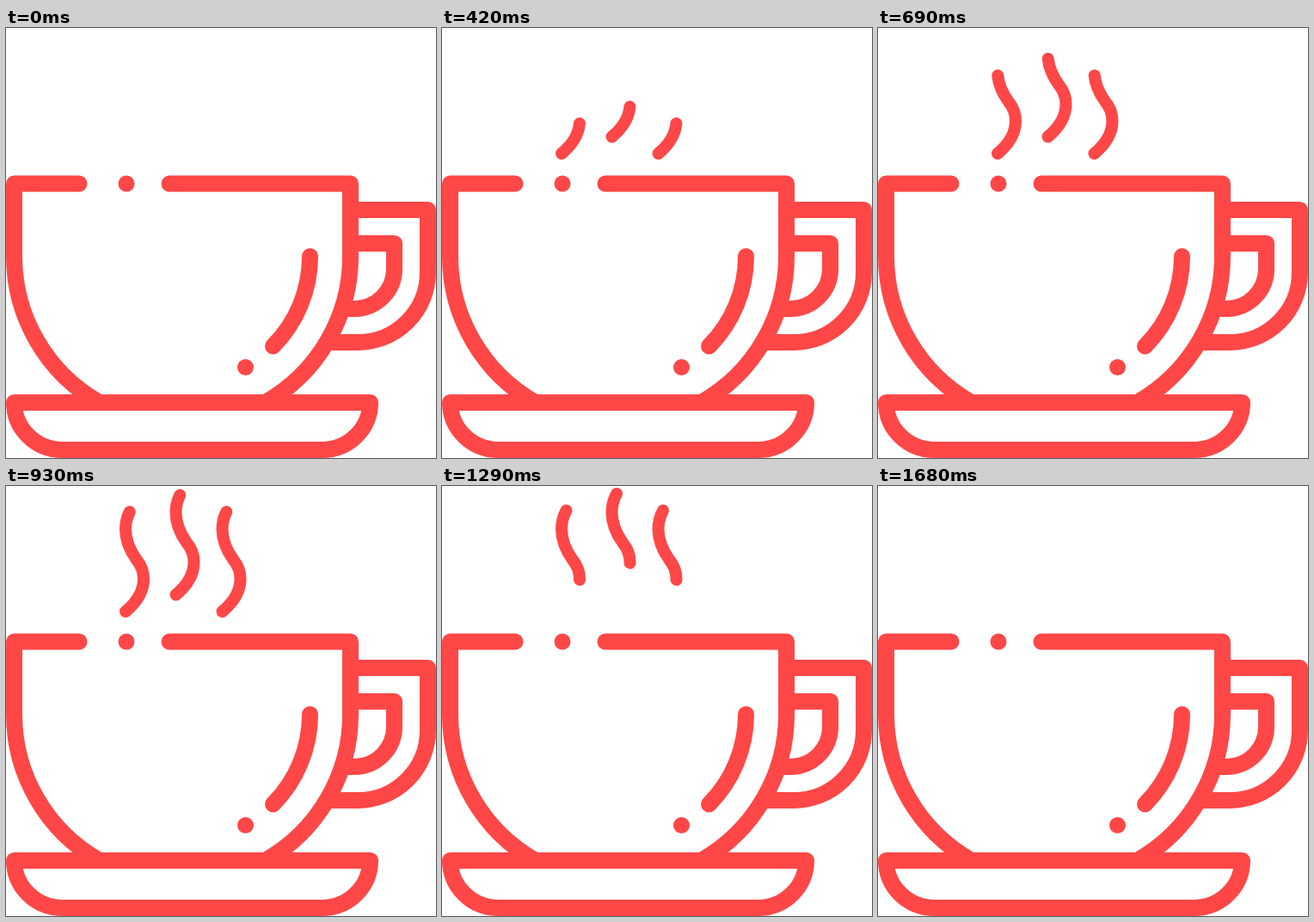
An HTML page for the animation above (1.83 s loop, 500 px wide and 500 px high).

```html
<!DOCTYPE html>
<html lang="en">
<head>
<meta charset="utf-8">
<title>Steaming cup</title>
<style>
  html, body { margin: 0; width: 100%; height: 100%; overflow: hidden; background: #fff; }
  svg { display: block; width: 100%; height: 100%; }
  .line { fill: none; stroke: #ff4747; stroke-width: 19; stroke-linecap: round; stroke-linejoin: round; }
  #steam { stroke-width: 14; }
</style>
</head>
<body>
<svg viewBox="0 0 500 500">
  <defs>
    <path id="wisp" pathLength="1" d="M139 146C151 136 160 123 160 108C160 98 157 92 152 86C144 75 139 64 139 50C139 42 141 35 144.5 28.5"/>
  </defs>
  <g class="line">
    <!-- cup -->
    <path d="M85 181H9.5V265.5A195.5 195.5 0 0 0 108.5 435.5"/>
    <path d="M190 181H400.5V265.5A195.5 195.5 0 0 1 301.5 435.5"/>
    <path d="M140 181h0M278.5 394.5h0"/>
    <path d="M353.5 265.5A148.5 148.5 0 0 1 310.5 370"/>
    <!-- handle -->
    <path d="M400.5 211.5H490.5V284A81.5 81.5 0 0 1 409 365.5H373"/>
    <path d="M400.5 250.5H451.5V280A46.5 46.5 0 0 1 405 326.5H391"/>
    <!-- saucer -->
    <path d="M9.5 435.5H423.5A56 55 0 0 1 367.5 490.5H65.5A56 55 0 0 1 9.5 435.5Z"/>
  </g>
  <g id="steam" class="line" visibility="hidden">
    <use href="#wisp"/>
    <use href="#wisp" x="58.5" y="-19.5"/>
    <use href="#wisp" x="112.5"/>
  </g>
</svg>
<script>
  const LOOP = 1830, STEP = 30, GONE = 1680;
  const steam = document.getElementById('steam');
  const progress = (t, start, length) => Math.min(1, Math.max(0, (t - start) / length));
  const easeQuad = x => x < 0.5 ? 2 * x * x : 1 - 2 * (1 - x) ** 2;
  const easeSine = x => (1 - Math.cos(Math.PI * x)) / 2;

  function draw(now) {
    const t = Math.floor(now % LOOP / STEP) * STEP;
    const head = easeQuad(progress(t, 25, 985));
    const tail = easeSine(progress(t, 1030, 660));
    steam.setAttribute('visibility', head > 0 && t < GONE ? 'visible' : 'hidden');
    steam.setAttribute('stroke-dasharray', `${Math.max(head - tail, 0.0005)} 3`);
    steam.setAttribute('stroke-dashoffset', -tail);
  }

  let begin;
  function frame(now) {
    begin ??= now;
    draw(now - begin);
    requestAnimationFrame(frame);
  }
  requestAnimationFrame(frame);
</script>
</body>
</html>
```
